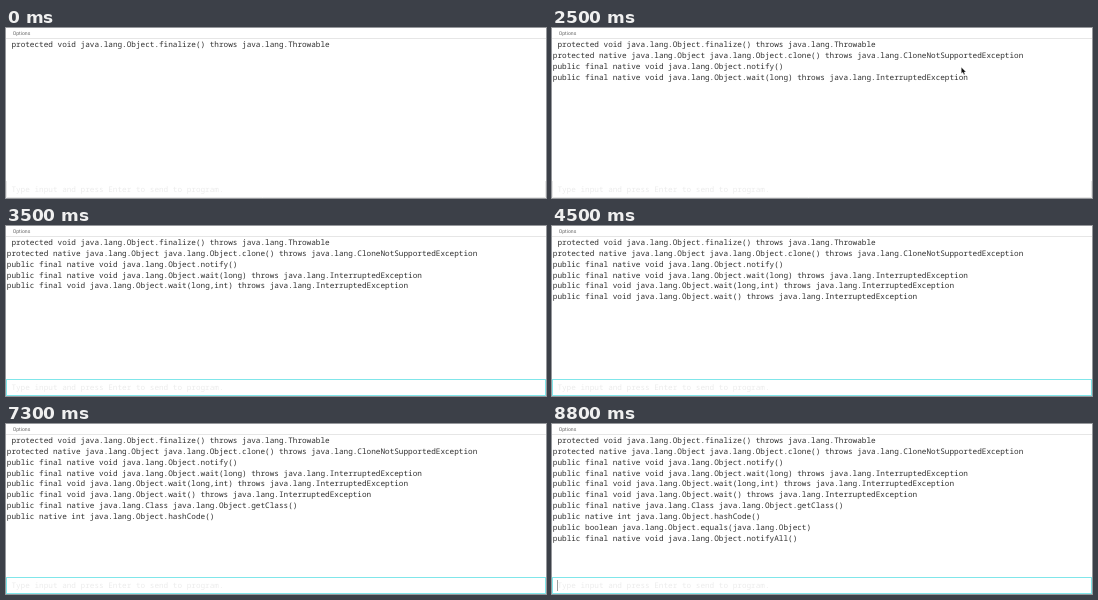
Write an HTML page that moves like this. It is 540 px wide and 170 px high and loops after 9 s.

```html
<!DOCTYPE html>
<html lang="en">
<head>
<meta charset="utf-8">
<title>Console output</title>
<style>
  html, body { margin: 0; width: 100%; height: 100%; overflow: hidden; background: #fff; }
  svg { display: block; width: 540px; height: 170px; }
  text { font: 7.7px "Roboto Mono", "Noto Sans Mono", monospace; fill: #303030; text-rendering: geometricPrecision; white-space: pre; }
  .label { font: 5.1px Roboto, sans-serif; fill: #666; }
  .hint { fill: #ececec; }
</style>
</head>
<body>
<svg viewBox="0 0 540 170">
  <text class="label" x="6.7" y="7.3">Options</text>
  <rect y="10" width="540" height="1" fill="#e6e6e6"/>
  <g id="output"></g>
  <text class="hint" x="5.4" y="164">Type input and press Enter to send to program.</text>
  <path id="idle" d="M.5 153V169.5H539.5V153" fill="none" stroke="#e6e6e6"/>
  <rect id="focus" x=".5" y="153.5" width="539" height="16" fill="none" stroke="#80e6ea"/>
  <rect id="caret" x="5" y="156" width="1" height="11" fill="#a0a0a0"/>
  <path id="beam" d="M-1.5-4H1.5M0-4V4M-1.5 4H1.5" fill="none" stroke="#222"/>
  <path id="arrow" d="M0 0V6.4L1.5 5.1L2.6 7.5L3.7 7L2.7 4.8H4.7Z" fill="#111" stroke="#fff" stroke-width=".3"/>
</svg>
<script>
const LOOP = 9000, STEP = 100, LINE_EVERY = 1000, BLINK = 500;
const FIRST_LINE = 500, FOCUS_AT = 3000, CARET_PHASE = 2800;
const $ = id => document.getElementById(id);
const show = (el, on) => el.setAttribute("visibility", on ? "visible" : "hidden");

const methods = [
  " protected void java.lang.Object.finalize() throws java.lang.Throwable",
  "protected native java.lang.Object java.lang.Object.clone() throws java.lang.CloneNotSupportedException",
  "public final native void java.lang.Object.notify()",
  "public final native void java.lang.Object.wait(long) throws java.lang.InterruptedException",
  "public final void java.lang.Object.wait(long,int) throws java.lang.InterruptedException",
  "public final void java.lang.Object.wait() throws java.lang.InterruptedException",
  "public final native java.lang.Class java.lang.Object.getClass()",
  "public native int java.lang.Object.hashCode()",
  "public boolean java.lang.Object.equals(java.lang.Object)",
  "public final native void java.lang.Object.notifyAll()"
];

const lines = methods.map((method, i) => {
  const line = document.createElementNS("http://www.w3.org/2000/svg", "text");
  line.setAttribute("x", 0.8);
  line.setAttribute("y", 19.2 + 10.82 * i);
  line.textContent = method;
  $("output").append(line);
  return line;
});

// Pointer waypoints: time, x, y, shape
const pointer = [
  [1500, 318, 41, "beam"],
  [1700, 366, 33, "beam"],
  [2000, 411, 40, "beam"],
  [2200, 411, 41, "beam"],
  [2300, 409.3, 39.2, "arrow"],
  [2700, 409.3, 39.2, "arrow"],
  [3000, 372, 140, "arrow"],
  [3100, 368, 161, "beam"],
  [3200, 368, 161, "beam"]
];

function drawPointer(t) {
  const next = pointer.findIndex(p => p[0] > t);
  const active = next > 0;
  const shape = active && pointer[next - 1][3];
  for (const id of ["beam", "arrow"]) show($(id), shape === id);
  if (!active) return;
  const [t0, x0, y0] = pointer[next - 1], [t1, x1, y1] = pointer[next];
  const k = (t - t0) / (t1 - t0);
  $(shape).setAttribute("transform", `translate(${x0 + (x1 - x0) * k} ${y0 + (y1 - y0) * k})`);
}

function draw(now) {
  const t = Math.floor((now % LOOP) / STEP) * STEP;
  const focused = t >= FOCUS_AT;
  lines.forEach((line, i) => show(line, i === 0 || t >= FIRST_LINE + (i - 1) * LINE_EVERY));
  show($("idle"), !focused);
  show($("focus"), focused);
  show($("caret"), focused && Math.floor((t - CARET_PHASE) / BLINK) % 2 === 0);
  drawPointer(t);
}

const start = performance.now();
function tick() {
  draw(performance.now() - start);
  requestAnimationFrame(tick);
}
tick();
</script>
</body>
</html>
```
